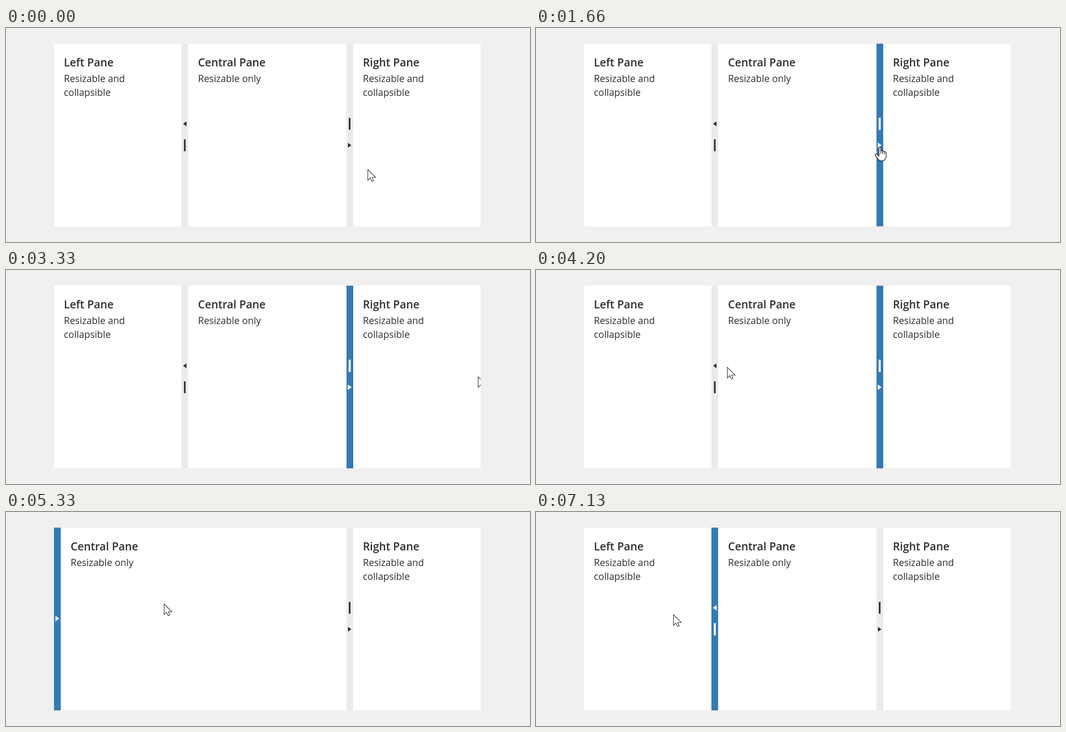
Animation of 1168x479 px, one loop 9130 ms. Source, as an HTML page with a canvas:

```html
<!DOCTYPE html>
<html lang="en">
<head>
<meta charset="utf-8">
<title>Splitter panes</title>
<style>
html, body { margin: 0; width: 100%; height: 100%; overflow: hidden; background: #f0f0f0; }
canvas { display: block; }
</style>
</head>
<body>
<canvas id="stage" width="1168" height="479"></canvas>
<script>
const ctx = document.getElementById('stage').getContext('2d');
const LOOP = 9130;
const BOX = { left: 107, top: 35, right: 1058, bottom: 444 };
const BAR = 15;
const INK = '#2e2e2e', BLUE = '#337ab7', GREY = '#ebebeb', HOVER = '#dedede';

// Pointer moves: start time, time of the last step, step count, [progress, x, y] points.
const moves = [
  { start: 1000, last: 1460, steps: 8, path: [[0, 806, 317], [0.3, 797, 303], [0.65, 778, 280], [1, 766, 267]] },
  { start: 2000, last: 2860, steps: 14, path: [[0, 766, 267], [0.15, 816, 273], [0.357, 918, 265], [0.65, 1008, 252], [1, 1052, 239]] },
  { start: 3400, last: 4200, steps: 13, path: [[0, 1052, 239], [0.2, 930, 237], [0.5, 680, 230], [0.8, 484, 222], [1, 426, 218]] },
  { start: 4260, last: 4530, steps: 5, path: [[0, 426, 218], [1, 402, 214]] },
  { start: 5130, last: 6000, steps: 13, path: [[0, 402, 214], [0.25, 348, 205], [0.6, 222, 214], [0.85, 143, 231], [1, 123, 238]] },
  { start: 6060, last: 6200, steps: 3, path: [[0, 123, 238], [1, 116, 239]] },
  { start: 6800, last: 7130, steps: 6, path: [[0, 116, 239], [0.4, 196, 239], [0.75, 272, 234], [1, 306, 230]] }
];

const during = (t, from, to) => t >= from && t < to;

function along(path, u) {
  let i = 1;
  while (i < path.length - 1 && path[i][0] < u) i++;
  const [u0, x0, y0] = path[i - 1], [u1, x1, y1] = path[i];
  const k = (u - u0) / (u1 - u0);
  return [x0 + (x1 - x0) * k, y0 + (y1 - y0) * k];
}

function pointerAt(t) {
  const move = moves.filter(m => m.start <= t).pop();
  if (!move) return moves[0].path[0].slice(1);
  const gap = (move.last - move.start) / (move.steps - 1);
  // Steps fall on whole hundredths of a second, so allow for their rounding.
  const step = Math.min(move.steps - 1, Math.floor((t - move.start + 8) / gap));
  return along(move.path, (step + 1) / move.steps);
}

function rect(x, y, w, h, color) {
  ctx.fillStyle = color;
  ctx.fillRect(x, y, w, h);
}

function column(x, right, color) {
  const left = Math.round(x);
  rect(left, BOX.top, Math.round(right) - left, BOX.bottom - BOX.top, color);
}

function triangle(cx, cy, dir, color, size) {
  const half = size * 0.5;
  ctx.fillStyle = color;
  ctx.beginPath();
  ctx.moveTo(cx + dir * half, cy);
  ctx.lineTo(cx - dir * half, cy - size * 0.74);
  ctx.lineTo(cx - dir * half, cy + size * 0.74);
  ctx.fill();
}

function splitter(x, dir, collapsed, focused, hovered) {
  column(x, x + BAR, focused ? BLUE : hovered ? HOVER : GREY);
  const color = focused ? '#fff' : INK;
  const size = focused ? 8.4 : 7.6;
  const cx = x + BAR / 2;
  if (collapsed) {
    triangle(cx, 238.5, -dir, color, size);
    return;
  }
  triangle(cx, 238.5 + dir * 24, dir, color, size);
  const w = focused ? 4.6 : 3.7, h = focused ? 27.5 : 26.5;
  rect(cx - w / 2, 238.5 - dir * 24 - h / 2, w, h, color);
}

function pane(x, right, title, lines) {
  column(x, right, '#fff');
  const left = x + 22;
  ctx.fillStyle = INK;
  ctx.font = '600 24.4px "Open Sans", "Noto Sans", sans-serif';
  ctx.fillText(title, left, 86);
  ctx.font = '400 21.25px "Open Sans", "Noto Sans", sans-serif';
  lines.forEach((line, i) => ctx.fillText(line, left, 121 + i * 31));
}

const arrowShape = new Path2D('M0 0V23.6L5.4 18.5L9 26.2L12.8 24.4L9.3 17.2H17.2Z');
const handShape = new Path2D(
  'M-2 17V2Q-2 0 0 0Q2.2 0 2.2 2V8.5Q3 6.9 4.6 7.2Q6.3 7.5 6.3 9.3' +
  'Q7.2 8 8.7 8.4Q10.3 8.8 10.3 10.6Q11.2 9.6 12.6 10.2Q14 10.8 14 12.8' +
  'V20Q14 24 11.5 27Q8.8 30.5 4 30.5Q-1 30.5 -4 26.5L-10 18.5' +
  'Q-11.2 16.5 -9.6 15.4Q-8 14.6 -5.6 16.4L-2 19.5Z');
const handLines = new Path2D('M2.2 8V14.5M6.3 9V15M10.3 10.5V15.5');

function pointer(x, y, hand) {
  ctx.save();
  ctx.beginPath();
  ctx.rect(BOX.left, BOX.top, BOX.right - BOX.left, BOX.bottom - BOX.top);
  ctx.clip();
  ctx.translate(Math.round(x) + 0.5, Math.round(y));
  ctx.fillStyle = '#fff';
  ctx.strokeStyle = '#1c1c24';
  ctx.lineWidth = hand ? 1.4 : 1.15;
  const shape = hand ? handShape : arrowShape;
  ctx.fill(shape);
  ctx.stroke(shape);
  if (hand) ctx.stroke(handLines);
  ctx.restore();
}

function draw(t) {
  const leftShut = during(t, 4860, 6460);
  const rightShut = during(t, 1800, 3330);
  const leftBar = leftShut ? BOX.left : 391;
  const rightBar = rightShut ? BOX.right - BAR : 758.5;

  rect(0, 0, 1168, 479, '#f0f0f0');
  ctx.strokeStyle = '#f7f7f7';
  ctx.lineWidth = 1;
  ctx.strokeRect(0.5, 0.5, 1167, 478);

  const both = ['Resizable and', 'collapsible'];
  if (!leftShut) pane(BOX.left, leftBar, 'Left Pane', both);
  pane(leftBar + BAR, rightBar, 'Central Pane', ['Resizable only']);
  if (!rightShut) pane(rightBar + BAR, BOX.right, 'Right Pane', both);

  splitter(leftBar, -1, leftShut, t >= 4800, during(t, 4390, 4800));
  splitter(rightBar, 1, rightShut, during(t, 1660, 4800), during(t, 1390, 1660));

  const hand = during(t, 1455, 1800) || during(t, 2855, 3330) ||
    during(t, 4525, 4930) || during(t, 6195, 6530);
  const [x, y] = pointerAt(t);
  pointer(x, y, hand);
}

function tick() {
  draw(performance.now() % LOOP);
  requestAnimationFrame(tick);
}
tick();
</script>
</body>
</html>
```
